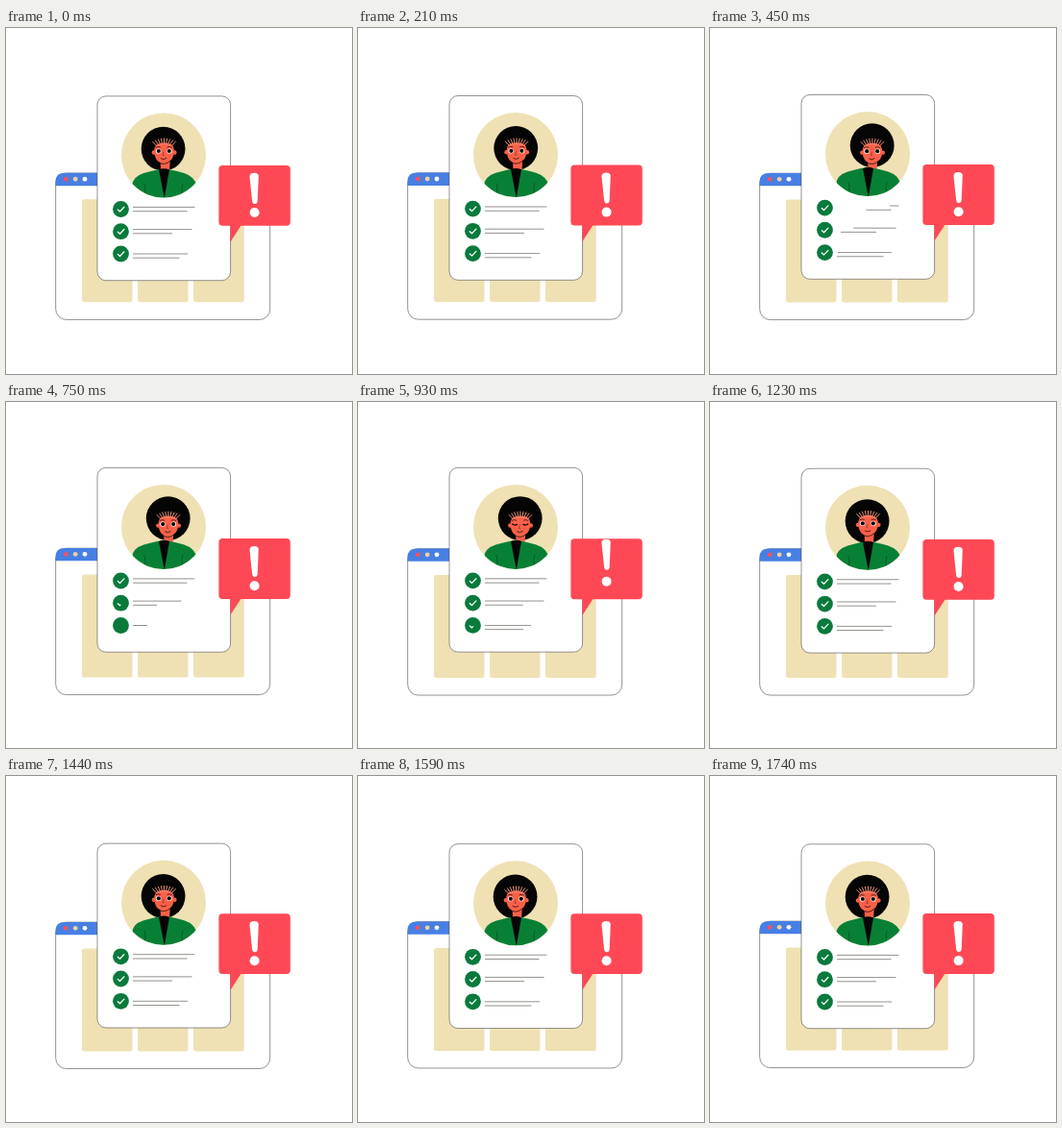
An HTML page that plays this animation: 360 px wide and 360 px high, repeating every 1.77 s.

```html
<!DOCTYPE html>
<html lang="en">
<head>
<meta charset="utf-8">
<title>Profile alert</title>
<style>
  html, body { margin: 0; width: 100%; height: 100%; overflow: hidden; background: #fff; }
  svg { display: block; width: 100vw; height: 100vh; }
  .edge { fill: #fff; stroke: #4a4a4a; stroke-width: .6; }
  .sand { fill: #efe1b3; }
  .skin { fill: #fb6049; }
  .green { fill: #087a3b; }
  .coat { fill: #078036; }
  .ink { fill: #050505; }
  .thin { fill: none; stroke: #050505; stroke-width: .7; stroke-linecap: round; }
  .rule { stroke: #66625c; stroke-width: .7; }
  .tick { fill: none; stroke: #fff; stroke-width: 1.25; stroke-linecap: round; stroke-linejoin: round; }
</style>
</head>
<body>
<svg viewBox="0 0 360 360">
  <defs>
    <clipPath id="disc"><circle cx="164" cy="132.5" r="44"/></clipPath>
  </defs>

  <g id="browser">
    <rect class="edge" x="51.7" y="151.2" width="223" height="152.4" rx="11"/>
    <path fill="#477fe4" d="M51.5 164.4V160Q51.5 151 61 151H265Q274.7 151 274.7 160V164.4Z"/>
    <circle cx="62.3" cy="157.4" r="2.4" fill="#f4535d"/>
    <circle cx="72.2" cy="157.4" r="2.4" fill="#f0cf9e"/>
    <circle cx="82" cy="157.4" r="2.4" fill="#fff"/>
    <g class="sand">
      <rect x="79" y="178.5" width="52.5" height="107" rx="2.5"/>
      <rect x="137" y="178.5" width="52.5" height="107" rx="2.5"/>
      <rect x="195" y="178.5" width="52.7" height="107" rx="2.5"/>
    </g>
  </g>

  <g id="card">
    <rect class="edge" x="95" y="70.9" width="138.6" height="191.8" rx="9"/>
    <circle class="sand" cx="164" cy="132.5" r="44"/>
    <g clip-path="url(#disc)">
      <circle id="hair" class="ink" cx="163.6" cy="125.7" r="22.9"/>
      <path id="neck" class="skin" d="M160.5 134H171L170 150H161Z"/>
      <path class="coat" d="M128 178L132 160Q135 152 150 149.3L158 147.3H170L179 149.3Q193 152 197 160L201 178Z"/>
      <path class="ink" d="M159 147.6Q164 145 170 147.6L164.8 177Z"/>
      <path class="thin" stroke-opacity=".45" d="M144 162Q146 168 144 176M184 162Q182 168 184 176"/>
      <g id="face">
        <circle class="skin" cx="153.9" cy="129.5" r="2.2"/>
        <circle class="skin" cx="175.4" cy="129.5" r="2.2"/>
        <path class="skin" d="M154.3 126Q154.8 119.5 164.5 119.5T174.8 126Q175.4 134 171 138.2Q167.5 141.6 164.3 141.6Q160.3 141.6 157 137.5Q153.8 133 154.3 126Z"/>
        <path class="thin" d="M158 139Q164 144.6 171.5 138"/>
        <g id="strands" stroke="#ff9c82" stroke-width=".9" stroke-linecap="round"></g>
        <path class="thin" d="M156 124.2Q158.2 122.8 160.4 124M168 124Q170.2 122.8 172.4 124.2"/>
        <g id="open">
          <ellipse cx="158.6" cy="128" rx="2.7" ry="2.6" fill="#fff"/>
          <ellipse cx="170" cy="128" rx="2.7" ry="2.6" fill="#fff"/>
          <circle class="ink" cx="158.8" cy="128" r="2.1"/>
          <circle class="ink" cx="169.8" cy="128" r="2.1"/>
        </g>
        <path id="shut" class="thin" style="stroke-width:1.3" d="M156.2 128Q158.6 129.8 161 128.4M167.6 128.4Q170 129.8 172.4 128"/>
        <path class="thin" stroke-opacity=".5" d="M164 129L163 132.3L164.4 132.6"/>
        <path class="thin" d="M161.2 135.8Q164 137.8 166.8 135.6"/>
      </g>
    </g>
    <g id="rows"></g>
  </g>

  <g id="bubble">
    <path fill="#fe4855" d="M233.4 203H246L233.4 222.5Z"/>
    <rect x="221.4" y="142.8" width="74.4" height="62.9" rx="4" fill="#fe4855"/>
    <path id="bar" fill="#fff" d="M253.5 154.5Q253.6 150.8 258.2 150.7T262.8 154.3L261.7 179.8Q261.5 182.8 259 182.8T256.1 179.8Z"/>
    <circle id="dot" cx="258.6" cy="191.9" r="5" fill="#fff"/>
  </g>
</svg>
<script>
  const LOOP = 1770, STEP = 30, LEFT = 132;
  const $ = id => document.getElementById(id);

  function add(parent, tag, attrs) {
    const el = document.createElementNS('http://www.w3.org/2000/svg', tag);
    for (const k in attrs) el.setAttribute(k, attrs[k]);
    return parent.appendChild(el);
  }

  const clamp = x => Math.min(1, Math.max(0, x));
  const span = (t, start, length) => clamp((t - start) / length);
  const smooth = x => x * x * (3 - 2 * x);
  const easeOut = x => 1 - (1 - x) * (1 - x);
  const wave = (t, peak) => Math.cos(2 * Math.PI * (t - peak) / LOOP);
  const hop = (t, start, length) => Math.sin(Math.PI * span(t, start, length));
  const move = (id, x, y) => $(id).setAttribute('transform', `translate(${x.toFixed(2)} ${y.toFixed(2)})`);

  // y, right end, erase start, draw start, draw length
  const rules = [
    [186.4, 196.5, 265, 465, 290], [190.7, 188.5, 303, 503, 260],
    [209.6, 193.5, 344, 545, 356], [213.8, 173, 387, 600, 400],
    [235, 189, 425, 695, 391], [239.2, 180.5, 465, 755, 300]
  ].map(([y, end, out, back, length]) => ({
    end, out, back, length,
    el: add($('rows'), 'line', { class: 'rule', x1: LEFT, x2: end, y1: y, y2: y })
  }));

  // y, erase start, draw start
  const ticks = [[188.5, 460, 555], [211.7, 545, 690], [235, 620, 855]].map(([y, out, back]) => {
    add($('rows'), 'circle', { class: 'green', cx: 119.5, cy: y, r: 8.4 });
    const el = add($('rows'), 'path', {
      class: 'tick', pathLength: 1, d: `M116.3 ${y + .4}l2.2 2.1l4.4 -4.7`
    });
    return { el, out, back };
  });

  for (let i = -4; i <= 4; i++) {
    const a = i * .2, x = 164.5 + i * 1.9, y = 121 + i * i * .1;
    add($('strands'), 'line', { x1: x, y1: y, x2: x + 6 * Math.sin(a), y2: y - 6 * Math.cos(a) });
  }

  function drawRule(r, t) {
    const again = t >= r.back;
    const gone = span(t, r.out, 200) ** 2;
    const width = r.end - LEFT;
    const from = again ? LEFT : LEFT + width * gone;
    const to = again ? LEFT + width * easeOut(span(t, r.back, r.length)) : r.end;
    r.el.setAttribute('x1', from);
    r.el.setAttribute('x2', to);
    r.el.style.visibility = to - from < .1 ? 'hidden' : 'visible';
  }

  function drawTick(k, t) {
    const from = t < k.back ? span(t, k.out, 80) : 0;
    const to = t < k.back ? 1 : span(t, k.back, 150);
    const size = to - from;
    k.el.style.strokeDasharray = `${size} 3`;
    k.el.style.strokeDashoffset = -from;
    k.el.style.visibility = size < .02 ? 'hidden' : 'visible';
  }

  function render(now) {
    const t = Math.floor(now % LOOP / STEP) * STEP;
    move('browser', 0, .6 - wave(t, 200));
    move('card', 0, -1.3 + 1.3 * wave(t, 1750));
    move('bubble', 0, -.2 + .6 * wave(t, 1500));

    const turn = smooth(span(t, 150, 270)) - smooth(span(t, 950, 260));
    move('hair', 5.1 * turn, -2.1 * turn);
    move('neck', 3.5 * turn, 0);
    move('face', 4.4 * turn, 1.6 * turn);
    const blink = t >= 870 && t <= 990;
    $('open').style.visibility = blink ? 'hidden' : 'visible';
    $('shut').style.visibility = blink ? 'visible' : 'hidden';

    move('bar', 0, -7.5 * hop(t, 770, 320));
    move('dot', 0, -4.8 * hop(t, 790, 320));
    rules.forEach(r => drawRule(r, t));
    ticks.forEach(k => drawTick(k, t));
  }

  const start = performance.now();
  function loop() {
    render(performance.now() - start);
    requestAnimationFrame(loop);
  }
  loop();
</script>
</body>
</html>
```
